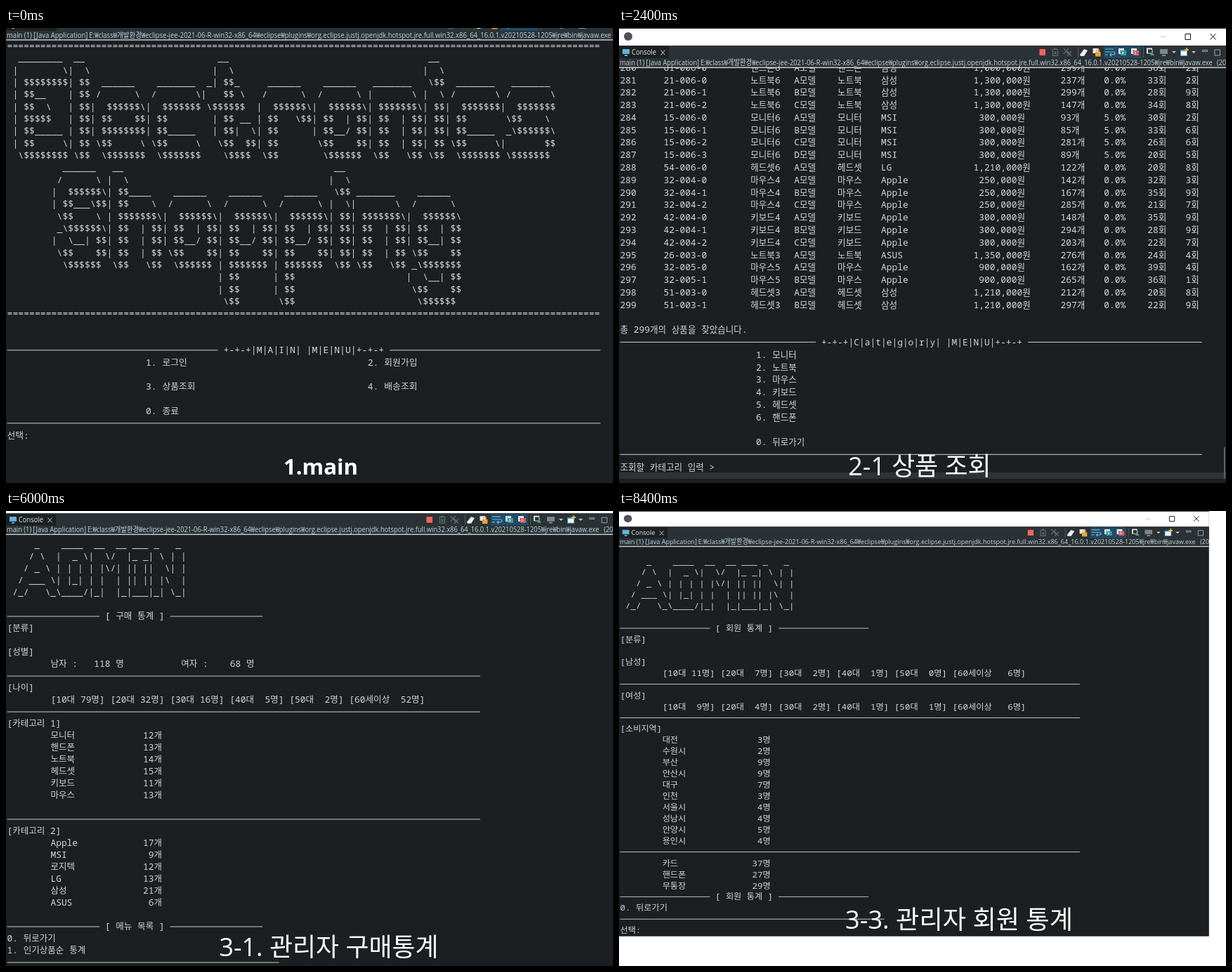
Animation of 864 by 648 pixels, one loop 9.6 s. Source, as an HTML page:

```html
<!DOCTYPE html>
<html lang="ko">
<head>
<meta charset="utf-8">
<title>Console tour</title>
<style>
  html, body { margin: 0; width: 100%; height: 100%; overflow: hidden; background: #fff; }
  svg { display: block; width: 864px; height: 648px; }
  text { white-space: pre; }
  .out { font: 500 12.9px "Noto Sans Mono", "Noto Sans CJK KR", "Noto Sans CJK JP", monospace; fill: #d4d6d7; }
  .ko { font-size: 12.55px; font-weight: 400; }
  .ui { font: 11px "Open Sans", "Noto Sans CJK KR", "Noto Sans CJK JP", sans-serif; fill: #bfd4dc; }
  .caption { font-family: "Open Sans", "Noto Sans CJK KR", "Noto Sans CJK JP", sans-serif; fill: #fff; text-anchor: middle; }
</style>
</head>
<body>
<svg id="stage" viewBox="0 0 864 648" xmlns="http://www.w3.org/2000/svg"></svg>
<script>
const LOOP = 9600, CELL = 7.74, LEFT = 1.5, PITCH = 17.78, COLS = 107;

// Block letters, rows separated by "~".
const LETTERS = {
  E: String.raw` ________~|        \~| $$$$$$$$~| $$__~| $$  \~| $$$$$~| $$_____~| $$     \~ \$$$$$$$$`,
  S: String.raw`  ______~ /      \~|  $$$$$$\~| $$___\$$~ \$$    \~ _\$$$$$$\~|  \__| $$~ \$$    $$~  \$$$$$$`,
  l: String.raw` __~|  \~| $$~| $$~| $$~| $$~| $$~| $$~ \$$`,
  i: String.raw` __~|  \~ \$$~|  \~| $$~| $$~| $$~| $$~ \$$`,
  h: String.raw` __~|  \~| $$____~| $$    \~| $$$$$$$\~| $$  | $$~| $$  | $$~| $$  | $$~ \$$   \$$`,
  t: String.raw`   __~  |  \~ _| $$_~|   $$ \~ \$$$$$$~  | $$ __~  | $$|  \~   \$$  $$~    \$$$$`,
  e: String.raw`~~  ______~ /      \~|  $$$$$$\~| $$    $$~| $$$$$$$$~ \$$     \~  \$$$$$$$`,
  c: String.raw`~~  _______~ /       \~|  $$$$$$$~| $$~| $$_____~ \$$     \~  \$$$$$$$`,
  r: String.raw`~~  ______~ /      \~|  $$$$$$\~| $$   \$$~| $$~| $$~ \$$`,
  o: String.raw`~~  ______~ /      \~|  $$$$$$\~| $$  | $$~| $$__/ $$~ \$$    $$~  \$$$$$$`,
  n: String.raw`~~ _______~|       \~| $$$$$$$\~| $$  | $$~| $$  | $$~| $$  | $$~ \$$   \$$`,
  s: String.raw`~~  _______~ /       \~|  $$$$$$$~ \$$    \~ _\$$$$$$\~|       $$~ \$$$$$$$`,
  p: String.raw`~~  ______~ /      \~|  $$$$$$\~| $$  | $$~| $$__/ $$~| $$    $$~| $$$$$$$~| $$~| $$~ \$$`,
  g: String.raw`~~  ______~ /      \~|  $$$$$$\~| $$  | $$~| $$__| $$~ \$$    $$~ _\$$$$$$$~|  \__| $$~ \$$    $$~  \$$$$$$`
};

const LOGIN = String.raw`   __             _
  / /  ___   __ _(_)_ __
 / /  / _ \ / _${'`'} | | '_ \
/ /__| (_) | (_| | | | | |
\____/\___/ \__, |_|_| |_|
            |___/`;

const ADMIN = String.raw`    _    ____  __  __ ___ _   _
   / \  |  _ \|  \/  |_ _| \ | |
  / _ \ | | | | |\/| || ||  \| |
 / ___ \| |_| | |  | || || |\  |
/_/   \_\____/|_|  |_|___|_| \_|`;

function banner(word) {
  const glyphs = [...word].map(ch => LETTERS[ch].split('~'));
  const widths = glyphs.map(g => Math.max(...g.map(row => row.length)));
  return Array.from({ length: 12 }, (_, r) =>
    glyphs.map((g, k) => (g[r] || '').padEnd(widths[k])).join('')).join('\n');
}

// Console items: [row, column, text] or, with a number last, a rule [row, from, to].
const heading = (row, text, from, to, end = COLS) => [[row, 0, from], [row, from + 1, text], [row, to, end]];
const menu = (row, ...items) => items.map((text, i) => [row + 2 * (i >> 1), i % 2 ? 65 : 25, text]);
const section = (row, title) => heading(row, `[ ${title} ]`, 17, 30, 47);
const stats = (row, unit, list) => list.split(' ').flatMap((pair, i) => {
  const [name, count] = pair.split(':');
  return [[row + i, 8, name], [row + i, 25, count.padStart(2) + unit]];
});
const ages = (...counts) => counts.map((n, i) =>
  i < 5 ? `[${i + 1}0대 ${String(n).padStart(2)}명]` : `[60세이상  ${String(n).padStart(2)}명]`).join(' ');

// code, category, brand, price, discount, then "stock rating sales" per model
const PRODUCTS = [
  ['61-006', '핸드폰', '삼성', '1,000,000', '0.0', '299 36 2'],
  ['21-006', '노트북', '삼성', '1,300,000', '0.0', '237 33 2', '299 28 9', '147 34 8'],
  ['15-006', '모니터', 'MSI', '300,000', '5.0', '93 30 2', '85 33 6', '281 26 6', '89 20 5'],
  ['54-006', '헤드셋', 'LG', '1,210,000', '0.0', '122 20 8'],
  ['32-004', '마우스', 'Apple', '250,000', '0.0', '142 32 3', '167 35 9', '285 21 7'],
  ['42-004', '키보드', 'Apple', '300,000', '0.0', '148 35 9', '294 28 9', '203 22 7'],
  ['26-003', '노트북', 'ASUS', '1,350,000', '0.0', '276 24 4'],
  ['32-005', '마우스', 'Apple', '900,000', '0.0', '162 39 4', '265 36 1'],
  ['51-003', '헤드셋', '삼성', '1,210,000', '0.0', '212 20 8', '297 22 9']
];

function productTable() {
  let row = 0;
  return PRODUCTS.flatMap(([code, kind, brand, price, off, ...models]) => models.flatMap((model, i) => {
    const [stock, rating, sales] = model.split(' ');
    const cells = [[0, 280 + row], [8, `${code}-${i}`], [24, kind + code.slice(-1)], [32, 'ABCD'[i] + '모델'],
      [40, kind], [48, brand], [price.length < 9 ? 66 : 65, price + '원'], [81, stock + '개'],
      [89, off + '%'], [97, rating + '회'], [104, sales + '회']];
    const line = row++;
    return cells.map(([col, text]) => [line, col, String(text)]);
  }));
}

const EQUALS = '='.repeat(COLS + 2);
const CATEGORIES = '모니터:12 핸드폰:13 노트북:14 헤드셋:15 키보드:11 마우스:13';
const BRANDS = 'Apple:17 MSI:9 로지텍:12 LG:13 삼성:21 ASUS:6';

// view: scale x, scale y, shift x, shift y; caption: text, centre x, baseline, size, weight
const SLIDES = [
  { view: [1.02, .975, 0, -38], top: 65.1, caption: ['1.main', 448, 636, 31.2, 700], body: [
    [0, 0, EQUALS.slice(2)], [1, 1, banner('Electronics')], [10, 8, banner('Shopping')], [22, 0, EQUALS.slice(2)],
    ...heading(25, '+-+-+|M|A|I|N| |M|E|N|U|+-+-+', 38, 69),
    ...menu(26, '1. 로그인', '2. 회원가입', '3. 상품조회', '4. 배송조회', '0. 종료'),
    [31, 0, COLS], [32, 0, '선택:']] },
  { view: [1.29, 1.237, -125, 1], top: 211, caption: ['2.Login', 406, 640, 31.4], body: [
    [0, 0, EQUALS], [1, 40, LOGIN], [7, 0, EQUALS],
    ...heading(10, '+-+-+|M|E|N|U|+-+-+', 43, 64),
    ...menu(11, '1. 회원 로그인', '2. 비회원 로그인', '3. 관리자 로그인', '4. 아이디찾기', '5. 비밀번호 찾기', '0. 뒤로가기'),
    [16, 0, COLS]] },
  { view: [1, 1, 0, 0], top: 56.2, bar: 633, caption: ['2-1 상품 조회', 428, 637, 35.9], body: [
    ...productTable(), [21, 0, '총 299개의 상품을 찾았습니다.'],
    ...heading(22, '+-+-+|C|a|t|e|g|o|r|y| |M|E|N|U|+-+-+', 36, 75),
    [23, 25, '1. 모니터\n2. 노트북\n3. 마우스\n4. 키보드\n5. 헤드셋\n6. 핸드폰\n\n0. 뒤로가기'],
    [31, 0, COLS], [32, 0, '조회할 카테고리 입력 >']] },
  { view: [1, 1.4625, 0, 1], top: 101.2, caption: ['2-2 상품 구매', 433, 631, 35.9], body: [
    ...heading(0, '[ 상품구매 - 주문서 작성 ]', 42, 65.4),
    [2, 0, '수취인 이름을 입력하세요. >한솔별'],
    [4, 0, '수취인 주소를 입력하세요. >경기도 성남시'],
    [6, 0, '수취인 연락처를 입력하세요. >000-1111-2222'],
    [8, 0, '1. 카드\n2. 무통장\n3. 핸드폰\n결제방법을 선택하세요. >1'],
    [13, 0, '사용할 포인트를 입력하세요. 보유 포인트: 5395\n4000'],
    [16, 0, '카드 결제 시스템 . . .\n위 정보가 올바르며 주문확정 하시겠습니까? (0: 아니오 / 1: 예)\n1']] },
  { view: [1, 1, 0, 0], top: 83, caption: ['3.관리자', 433, 634, 35.9], body: [
    [0, 1, ADMIN], ...heading(8, '+-+-+|M|E|N|U|+-+-+', 43, 64),
    ...menu(9, '1. 구매 통계', '2. 인기상품순 통계', '3. 회원 통계', '0. 뒤로가기'),
    [13, 0, COLS], [14, 0, '선택:']] },
  { view: [1, .956, 0, -20.5], top: 71.7, caption: ['3-1. 관리자 구매통계', 459.5, 634, 35.9], body: [
    [0, 1, ADMIN], ...section(6, '구매 통계'), [7, 0, '[분류]'], [9, 0, '[성별]'],
    [10, 8, '남자 :'], [10, 16, '118 명'], [10, 32, '여자 :'], [10, 41, '68 명'], [11, 0, 87],
    [12, 0, '[나이]'], [13, 8, ages(79, 32, 16, 5, 2, 52)], [14, 0, 87],
    [15, 0, '[카테고리 1]'], ...stats(16, '개', CATEGORIES), [23, 0, 87],
    [24, 0, '[카테고리 2]'], ...stats(25, '개', BRANDS),
    ...section(32, '메뉴 목록'), [33, 0, '0. 뒤로가기\n1. 인기상품순 통계'], [35, 0, 50]] },
  { view: [.972, .958, 0, 0], top: 79.7, caption: ['3-2. 관리자 인기상품순 통계', 484, 634, 35.9], body: [
    [0, 1, ADMIN], ...section(6, '인기상품순 통계'), [7, 0, '[분류]'],
    [9, 0, '[카테고리 1]'], ...stats(10, '개', CATEGORIES), [17, 0, 87],
    [18, 0, '[카테고리 2]'], ...stats(19, '개', BRANDS),
    ...section(26, '메뉴 목록'), [27, 0, '0. 뒤로가기'], [28, 0, 50], [29, 0, '선택:']] },
  { view: [.972, .896, 0, 0], top: 79.7, height: 676, caption: ['3-3. 관리자 회원 통계', 484, 595, 36.2], body: [
    [0, 1, ADMIN], ...section(6, '회원 통계'), [7, 0, '[분류]'],
    [9, 0, '[남성]'], [10, 8, ages(11, 7, 2, 1, 0, 6)], [11, 0, 87],
    [12, 0, '[여성]'], [13, 8, ages(9, 4, 2, 1, 1, 6)], [14, 0, 87],
    [15, 0, '[소비지역]'],
    ...stats(16, '명', '대전:3 수원시:2 부산:9 안산시:9 대구:7 인천:3 서울시:4 성남시:4 안양시:5 용인시:4'),
    [26, 0, 87], ...stats(27, '명', '카드:37 핸드폰:27 무통장:29'),
    ...section(30, '회원 통계'), [31, 0, '0. 뒤로가기'], [32, 0, 50], [33, 0, '선택:']] }
];

const rect = (x, y, w, h, fill) => `<rect x="${x}" y="${y}" width="${w}" height="${h}" fill="${fill}"/>`;
const path = (d, stroke, width = 1, fill = 'none') =>
  `<path d="${d}" stroke="${stroke}" stroke-width="${width}" fill="${fill}"/>`;
const label = (x, y, text, fill = '') =>
  `<text class="ui" xml:space="preserve" transform="translate(${x} ${y}) scale(.848 1)"${fill && ` style="fill:${fill}"`}>${text}</text>`;
const caret = x => path(`M${x - 3} 33h6l-3 3z`, 'none', 0, '#c5c9cb');
const terminal = (x, tint) => rect(x - 5, 29, 8, 8, '#e6edef') + rect(x - 2, 32, 8, 7, tint) +
  path(`M${x - 3} 31l2 2l-2 2`, '#2c6d80') + path(`M${x} 34l2 1.5l-2 1.5`, '#fff');

const toolbar = () => [
  rect(598.5, 30, 8.5, 9, '#f4645c'),
  path('M616.5 30.5h9M619 29h4M617.5 31.5v8h7v-8M619.5 33.5l3 4M622.5 33.5l-3 4', '#666d71', 1.2),
  path('M633 29l7 8M640 29l-7 8M638 33l6 7M644 33l-6 7', '#666d71', 1.3),
  path('M653.5 27v15M746.5 27v15', '#555d61'),
  path('M656 38l6-8l5 2l-5 8h-5z', 'none', 0, '#f2f2ee'),
  rect(674.5, 29, 8, 7, '#e8e8e4'), rect(678, 34, 7.5, 6.5, '#eda43c'), path('M679.5 34v-3h4v3', '#eda43c'),
  rect(690, 26, 53, 17, '#204a66'),
  path('M692 30h12M692 34h11q3 0 3 2t-3 2h-4M692 38h4M701 36l-2 2l2 2', '#79b3cc', 1.2),
  terminal(716, '#3d9d98'), terminal(734, '#e8594f'),
  rect(751, 28.5, 8, 8, '#d9e2e0'), rect(753, 30.5, 5, 5, '#25302f'), path('M759 31v7M756.5 38h5', '#4da473', 2),
  rect(770, 30, 11, 7, '#7d878c'), rect(773, 38, 5, 2, '#7d878c'), caret(790),
  rect(799, 31, 10, 9, '#4ea0cf'), rect(800, 33, 8, 6, '#f0f4f5'), path('M808 28v6M805 31h6', '#f1bd48', 1.6), caret(818),
  path('M830.5 31.5h7v2h-7z', '#9da4a7'), path('M848 31h7.5v8H848z', '#9da4a7')
].join('');

const header = () => [
  rect(0, 0, 864, 25, '#fff'), rect(0, 0, 864, 1, '#24282b'),
  '<circle cx="13" cy="12" r="6" fill="#50505c"/>',
  path('M771 12.5h7', '#c4c4c4'), path('M806 8.5h7.5v8H806z', '#111'), path('M841.5 8l8 8.5M849.5 8l-8 8.5', '#111'),
  rect(0, 25, 864, 31, '#2b3236'), rect(0, 26, 71, 17, '#1c2023'),
  rect(5, 30, 10, 7, '#62b2dc'), rect(8, 38, 4, 2, '#62b2dc'),
  label(18, 38, 'Console', '#e4e7e8'), path('M59.5 31.5l6 7M65.5 31.5l-6 7', '#c5c9cb'),
  toolbar(),
  label(1, 53, 'main (1) [Java Application]'),
  label(116, 53, 'E:₩class₩개발환경₩eclipse-jee-2021-06-R-win32-x86_64₩eclipse₩plugins₩org.eclipse.justj.openjdk.hotspot.jre.full.win32.x86_64_16.0.1.v20210528-1205₩jre₩bin₩javaw.exe'),
  label(851, 53, '(20'),
  rect(0, 55.7, 864, 1.4, '#d4d7d8')
].join('');

const scrollbars = y => rect(0, y, 864, 9, '#2d3235') + rect(861, y - 36, 2, 45, '#5a6165');

function printed(top, [row, col, what]) {
  const x = c => LEFT + c * CELL, y = r => top + r * PITCH;
  if (typeof what === 'number') return rect(x(col), y(row) - .5, x(what) - x(col), 1, '#d0d2d3');
  return what.split('\n').map((line, i) => {
    const spans = line.replace(/[가-힣]+/g, '<tspan class="ko">$&</tspan>');
    return `<text class="out" xml:space="preserve" x="${x(col)}" y="${y(row + i) + 4.6}">${spans}</text>`;
  }).join('');
}

function slide({ view: [sx, sy, dx, dy], top, height = 760, bar, caption, body }) {
  const [text, x, y, size, weight = 400] = caption;
  return `<g opacity="0"><rect width="864" height="648" fill="#fff"/>
    <g transform="matrix(${sx} 0 0 ${sy} ${dx} ${dy})">
      ${rect(0, 0, 864, height, '#1b1f22')}${bar ? scrollbars(bar) : ''}
      ${body.map(item => printed(top, item)).join('')}${header()}
    </g>
    <text class="caption" x="${x}" y="${y}" font-size="${size}" font-weight="${weight}">${text}</text></g>`;
}

const stage = document.getElementById('stage');
stage.innerHTML = SLIDES.map(slide).join('');
[...stage.children].forEach((group, i) => {
  const steps = SLIDES.map((_, k) => ({ opacity: +(k === i), offset: k / SLIDES.length, easing: 'step-end' }));
  group.animate([...steps, { opacity: 0, offset: 1 }], { duration: LOOP, iterations: Infinity });
});
</script>
</body>
</html>
```
